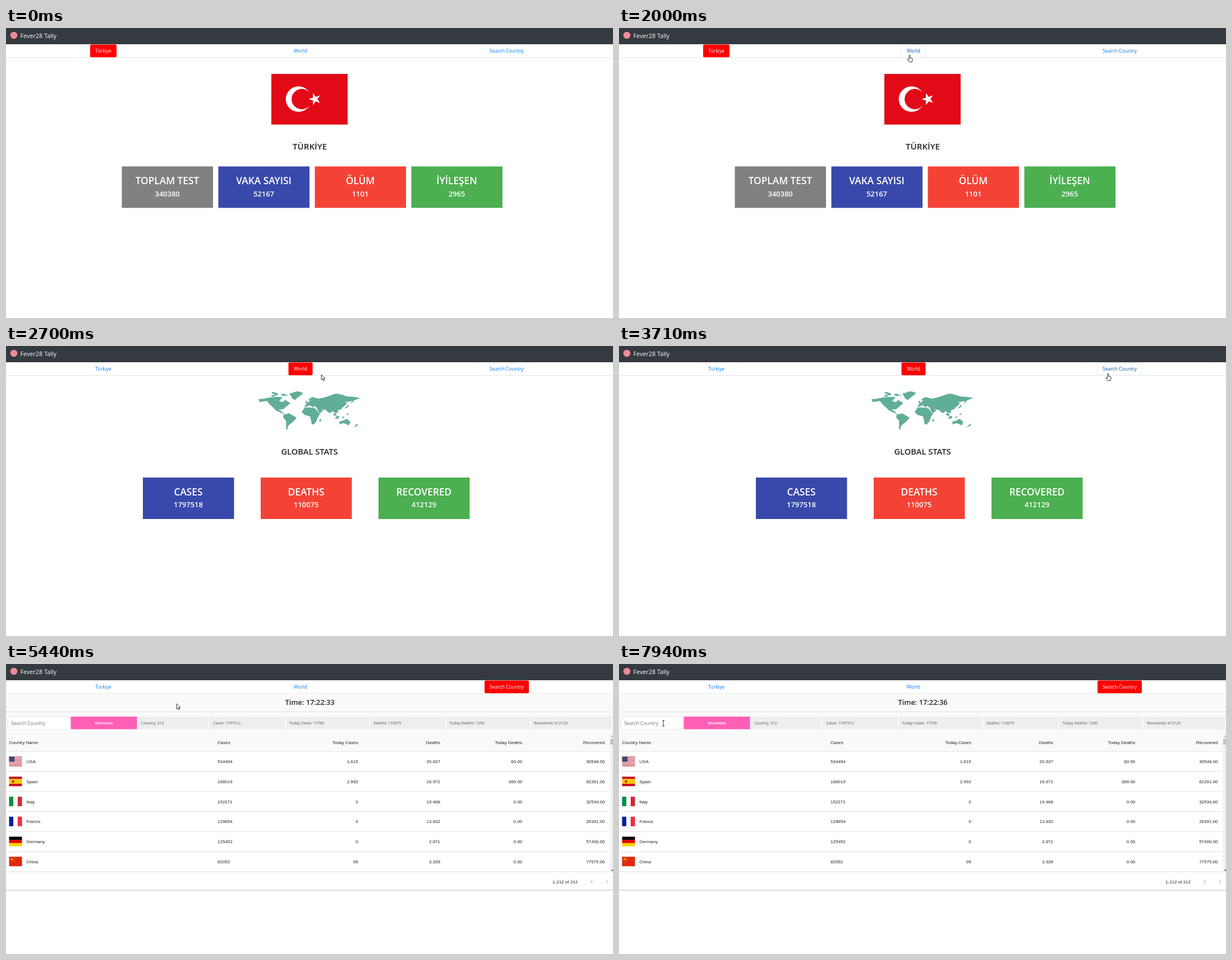
Write an HTML page that moves like this. It is 1082 by 518 pixels and loops after 8 s.

```html
<!DOCTYPE html>
<html lang="en">
<head>
<meta charset="utf-8">
<title>Fever28 Tally</title>
<style>
  html, body { margin: 0; height: 100%; overflow: hidden; background: #fff; }
  svg { display: block; width: 100vw; height: 100vh; font-family: "Open Sans", "Noto Sans", sans-serif; }
  .table { font-family: "Liberation Sans", Arial, sans-serif; }
</style>
</head>
<body>
<svg id="stage" viewBox="0 0 1082 518"></svg>
<script>
const LOOP = 8000, STEP = 76;
const switches = [-LOOP, 2070, 4030]; // when each view opens
const BLUE = '#3949ab', RED = '#f44336', GREEN = '#4caf50', INK = '#212529', LAND = '#60ae98';

const text = (x, y, size, str, fill = INK, anchor = 'start', weight = 400, id = '') =>
  `<text id="${id}" x="${x}" y="${y}" font-size="${size}" fill="${fill}" text-anchor="${anchor}" font-weight="${weight}">${str}</text>`;
const rect = (x, y, w, h, fill, extra = '') =>
  `<rect x="${x}" y="${y}" width="${w}" height="${h}" fill="${fill}" ${extra}/>`;
const path = (d, fill, extra = '') => `<path d="${d}" fill="${fill}" ${extra}/>`;
const circle = (x, y, r, fill) => `<circle cx="${x}" cy="${y}" r="${r}" fill="${fill}"/>`;
const repeat = (n, make) => Array.from({ length: n }, (_, i) => make(i)).join('');

let seed = 7;
const random = () => (seed = seed * 16807 % 2147483647) / 2147483647;
const jitter = size => (random() - .5) * size;

function star(cx, cy, r, turn, fill) {
  const points = repeat(10, i => {
    const a = turn + i * Math.PI / 5, d = i % 2 ? r * .382 : r;
    return `${cx + d * Math.cos(a)},${cy + d * Math.sin(a)} `;
  });
  return `<polygon points="${points}" fill="${fill}"/>`;
}

const cards = (x, y, gap, list) => list.map(([fill, title, value], i) =>
  rect(x + gap * i, y, 162.5, 74, fill) +
  text(x + gap * i + 81, y + 31.7, 17.3, title, '#fff', 'middle', 600) +
  text(x + gap * i + 81, y + 53.4, 13, value, '#fff', 'middle', 600)).join('');

function turkeyView() {
  return rect(473, 82, 136, 90.5, '#e30a17') +
    circle(521.5, 127, 22.8, '#fff') + circle(527.3, 127, 18.2, '#e30a17') +
    star(550.7, 127, 11.3, Math.PI, '#fff') +
    text(541.5, 216.6, 15.1, 'TÜRKİYE', INK, 'middle', 600) +
    cards(206.5, 247.3, 172, [['#808080', 'TOPLAM TEST', 340380], [BLUE, 'VAKA SAYISI', 52167],
      [RED, 'ÖLÜM', 1101], [GREEN, 'İYİLEŞEN', 2965]]);
}

// Key points of a shore, roughened halfway between each pair
function coast(shore) {
  const points = shore.split(' ').map(p => p.split(',').map(Number));
  const rough = points.flatMap(([x, y], i) => {
    const [nx, ny] = points[(i + 1) % points.length];
    return [x, y, (x + nx) / 2 + jitter(1.6), (y + ny) / 2 + jitter(1.6)];
  });
  return path(`M${rough.join(' ')}Z`, LAND);
}
const islands = (x, y, w, h, n) => repeat(n, () =>
  `<ellipse cx="${x + jitter(w)}" cy="${y + jitter(h)}" rx="${1.5 + random() * 2}" ry="${.7 + random()}" fill="${LAND}"/>`);

function worldView() {
  const northAmerica = '450,95 470,92 493,91 487,98 494,100 497,96 507,102 494,113 486,113 496,122 481,115 473,107 465,98 452,100';
  const southAmerica = '495,122 504,120 518,128 511,136 502,144 502,150 499,148 499,133 494,127';
  const africa = '532,110 541,110 552,112 558,120 562,120 557,125 553,135 549,140 545,140 542,126 532,123 527,118';
  const eurasia = '531,109 535,104 541,98 547,98 538,97 546,91 558,94 577,89 589,85 608,90 632,93 619,98 616,103 616,98 605,100 608,102 601,109 598,113 591,116 592,120 587,119 588,123 582,116 577,120 570,114 562,112 566,115 559,120 554,110 549,107 548,110 542,106';
  const greenland = '505,85 518,81 530,84 520,92 515,97 511,95';
  const australia = '594,135 607,130 614,136 611,142 602,138 594,140';
  const small = ['534,103 535,97 538,102', '610,104 611,107 603,112', '625,139 627,142 620,146', '562,130 560,136 558,133'];
  return [northAmerica, southAmerica, africa, eurasia, greenland, australia, ...small].map(coast).join('') +
    islands(488, 87, 28, 7, 11) + islands(597, 125, 24, 8, 8) +
    text(541, 194, 14.7, 'GLOBAL STATS', INK, 'middle', 600) +
    cards(244, 235, 210, [[BLUE, 'CASES', 1797518], [RED, 'DEATHS', 110075], [GREEN, 'RECOVERED', 412129]]);
}

// Flags are drawn in a 23 x 17 box
const stripes = colors => colors.map((c, i) => rect(0, i * 17 / colors.length, 23, 17 / colors.length, c)).join('');
const columns = colors => colors.map((c, i) => rect(i * 23 / 3, 0, 23 / 3, 17, c)).join('');
const flags = {
  USA: stripes([...'rwrwrwrwrwrwr'].map(c => c === 'r' ? '#bf2038' : '#fff')) + rect(0, 0, 9.7, 9.2, '#46466c'),
  Spain: stripes(['#c60b1e', '#ffc400', '#ffc400', '#c60b1e']) + rect(5, 6.3, 4, 4.6, '#ad3a1a', 'rx="1"'),
  Italy: columns(['#009246', '#fff', '#ce2b37']),
  France: columns(['#00209f', '#fff', '#f42a41']),
  Germany: stripes(['#000', '#d00', '#ffce00']),
  China: stripes(['#de2910']) + star(4.5, 4.5, 2.7, -Math.PI / 2, '#ffde00') +
    repeat(4, i => circle(4.5 + 5 * Math.cos(i * .5 - .7), 4.8 + 5 * Math.sin(i * .5 - .7), .6, '#ffde00'))
};

function searchView() {
  const rows = `USA 534494 1.615 20.637 60.00 30548.00
Spain 166019 2.992 16.972 366.00 62391.00
Italy 152271 0 19.468 0.00 32534.00
France 129654 0 13.832 0.00 26391.00
Germany 125452 0 2.871 0.00 57400.00
China 82052 99 3.339 0.00 77575.00`.split('\n').map(line => line.split(' '));
  const cells = (row, y, left) => row.map((s, i) =>
    text([left, 377, 627.7, 774, 920.3, 1067.5][i], y, 8, s, '#212121', i > 1 ? 'end' : 'start')).join('');
  let x = 235;
  const totals = ['Country: 212', 'Cases: 1797512', 'Today Cases: 17769', 'Deaths: 110075', 'Today Deaths: 1296', 'Recovered: 412129']
    .map(s => {
      const w = 81.8 + 3.7 * s.length, box = rect(x, 94, w, 22.5, '#eee') + text(x + 6, 108.2, 6.8, s, '#555');
      x += w + 2;
      return box;
    }).join('');
  return rect(0, 53, 1082, 103, '#fafafa') + rect(0, 85, 1082, 1, '#dedede') +
    text(541.5, 73, 12.8, '', INK, 'middle', 600, 'clock') +
    rect(3.5, 93.5, 110, 23.5, '#fff', 'rx="2" stroke="#e2e5e8"') +
    text(9, 108.5, 8.55, 'Search Country', '#6c757d') +
    rect(9, 99, 1, 12, '#222', 'id="caret"') +
    rect(115.5, 94, 118, 22.5, '#ff5fb4') + text(174.5, 108.2, 6.7, 'Wordwide', '#fff', 'middle', 600) +
    totals + '<g class="table">' +
    cells(['Country Name', 'Cases', 'Today Cases', 'Deaths', 'Today Deaths', 'Recovered'], 143, 5.5) +
    rows.map((row, i) => {
      const y = 174.2 + 35.75 * i;
      return `<g transform="translate(5.5 ${y - 8.7})">${flags[row[0]]}</g>` + cells(row, y + 2.8, 36.3);
    }).join('') +
    repeat(7, i => rect(0, 155.7 + 35.8 * i, 1076, 1, '#e0e0e0')) +
    text(1019, 391.6, 8, '1-212 of 212', '#212121', 'end') + '</g>' +
    path('M1045.5 386l-3 2.7 3 2.8M1069.700 386l3 2.7-3 2.8', 'none', 'stroke="#999"') +
    rect(1076.5, 124, 5.5, 249, '#f1f1f1') + rect(1077, 134, 5, 10, '#c1c1c1') +
    path('M1079 130.500l1.800-2.500 1.700 2.500Z', '#999') + path('M1079 367.500l1.800 2.500 1.700-2.500Z', '#333') +
    rect(0, 403.5, 1082, 1, '#b8b8b8');
}

const tabs = [
  { label: 'Türkiye', x: 150, w: 47 },
  { label: 'World', x: 503.5, w: 43 },
  { label: 'Search Country', x: 853, w: 79 }
];
const outline = 'stroke="#000" stroke-width=".8" stroke-linejoin="round"';

stage.innerHTML =
  rect(0, 0, 1082, 29, '#343a40') + circle(14, 13, 6.3, '#ef8a98') + text(25.5, 17.6, 10.8, 'Fever28 Tally', '#fff') +
  rect(0, 52.3, 1082, 1, '#dee2e6') +
  [turkeyView, worldView, searchView].map((view, i) => `<g id="view${i}">${view()}</g>`).join('') +
  tabs.map(({ label, x, w }, i) => rect(x, 29.6, w, 22.7, 'none', `rx="2" id="tab${i}"`) +
    text(x + w / 2, 44.2, 8.55, label, '', 'middle', 400, 'label' + i)).join('') +
  `<g id="cursor">
    <g id="arrow">${path('M0 0V9.5L2.2 7.5 3.8 11 5.3 10.4 3.8 7H6.7Z', '#fff', outline)}</g>
    <g id="hand">${path('M-1 1Q0-.6 1 1V5.2L4.3 6Q5.3 6.3 5.2 7.5L4.3 12.6H-1L-3.9 8.3Q-3.8 6.7-2.4 7.5L-1 8.6Z', '#fff', outline)}</g>
    <g id="beam">${path('M-2-5H2M0-5V5M-2 5H2', 'none', 'stroke="#222" stroke-width=".9"')}</g>
  </g>`;

const $ = id => document.getElementById(id);
const clamp = v => Math.min(1, Math.max(0, v));
const show = (id, on) => $(id).setAttribute('display', on ? 'inline' : 'none');
const mix = (a, b, p) => `rgb(${a.map((v, i) => Math.round(v + (b[i] - v) * p))})`;

// Each move goes on from the last one, along a curve pulled towards its bend
const moves = [
  { start: 190, end: 970, bend: [-134, 200], to: [415, 74] },
  { start: 1050, end: 1660, bend: [470, 74], to: [518, 48], power: 1.5 },
  { start: 2700, end: 3410, bend: [690, 62], to: [868, 48], power: 1.3 },
  { start: 3560, end: 3710, bend: [871, 50], to: [872, 49] },
  { start: 5040, end: 5040, bend: [870, 51], to: [868, 54] },
  { start: 5190, end: 5980, bend: [477, 35], to: [87, 101], power: 2.83 },
  { start: 6070, end: 6220, bend: [83, 105], to: [79, 106] }
];

function cursorAt(t) {
  const index = moves.findLastIndex(m => m.start <= t);
  if (index < 0) return null;
  const { start, end, bend, to, power = 1 } = moves[index];
  const from = index ? moves[index - 1].to : [781, 508];
  const steps = Math.round((end - start) / 78) + 1;
  const done = Math.floor((t - start) / 78 + .1) + 1;
  const q = (1 - clamp(done / steps)) ** power, p = 1 - q;
  return from.map((v, i) => q * q * v + 2 * p * q * bend[i] + p * p * to[i]);
}

function draw(t) {
  const active = switches.findLastIndex(s => s <= t);
  const held = Math.floor((t - switches[active]) / STEP) * STEP;
  const fade = 1 - (1 - clamp((held + 40) / 260)) ** 2.4;
  const p = clamp((held - 50) / 150), turn = p * p * (3 - 2 * p);

  const tip = cursorAt(t), [x, y] = tip || [-99, -99];
  const hovered = tabs.findIndex(tab => x > tab.x && x < tab.x + tab.w && y > 30 && y < 53);
  const inInput = active === 2 && x > 3 && x < 114 && y > 93 && y < 117;

  tabs.forEach((tab, i) => {
    const on = i === active, hover = i === hovered;
    const link = hover ? [0, 86, 179] : [0, 123, 255], white = [255, 255, 255];
    const whiteness = on ? turn : i === active - 1 ? 1 - turn : 0;
    show('view' + i, on);
    $('view' + i).setAttribute('opacity', fade);
    $('label' + i).setAttribute('fill', mix(link, white, whiteness));
    $('tab' + i).setAttribute('fill', on ? '#f00' : 'none');
    $('tab' + i).setAttribute('stroke', hover && !on ? '#e9ecef' : 'none');
  });

  $('clock').textContent = 'Time: 17:22:' + (33 + Math.max(-1, Math.floor((t - 4960) / 990)));
  show('caret', t >= 7000 && (t - 7000) % 970 < 470);

  show('cursor', tip);
  show('hand', hovered >= 0);
  show('beam', inInput);
  show('arrow', hovered < 0 && !inInput);
  $('cursor').setAttribute('transform', `translate(${x} ${y})`);
}

const began = performance.now();
(function loop() {
  draw((performance.now() - began) % LOOP);
  requestAnimationFrame(loop);
})();
</script>
</body>
</html>
```
